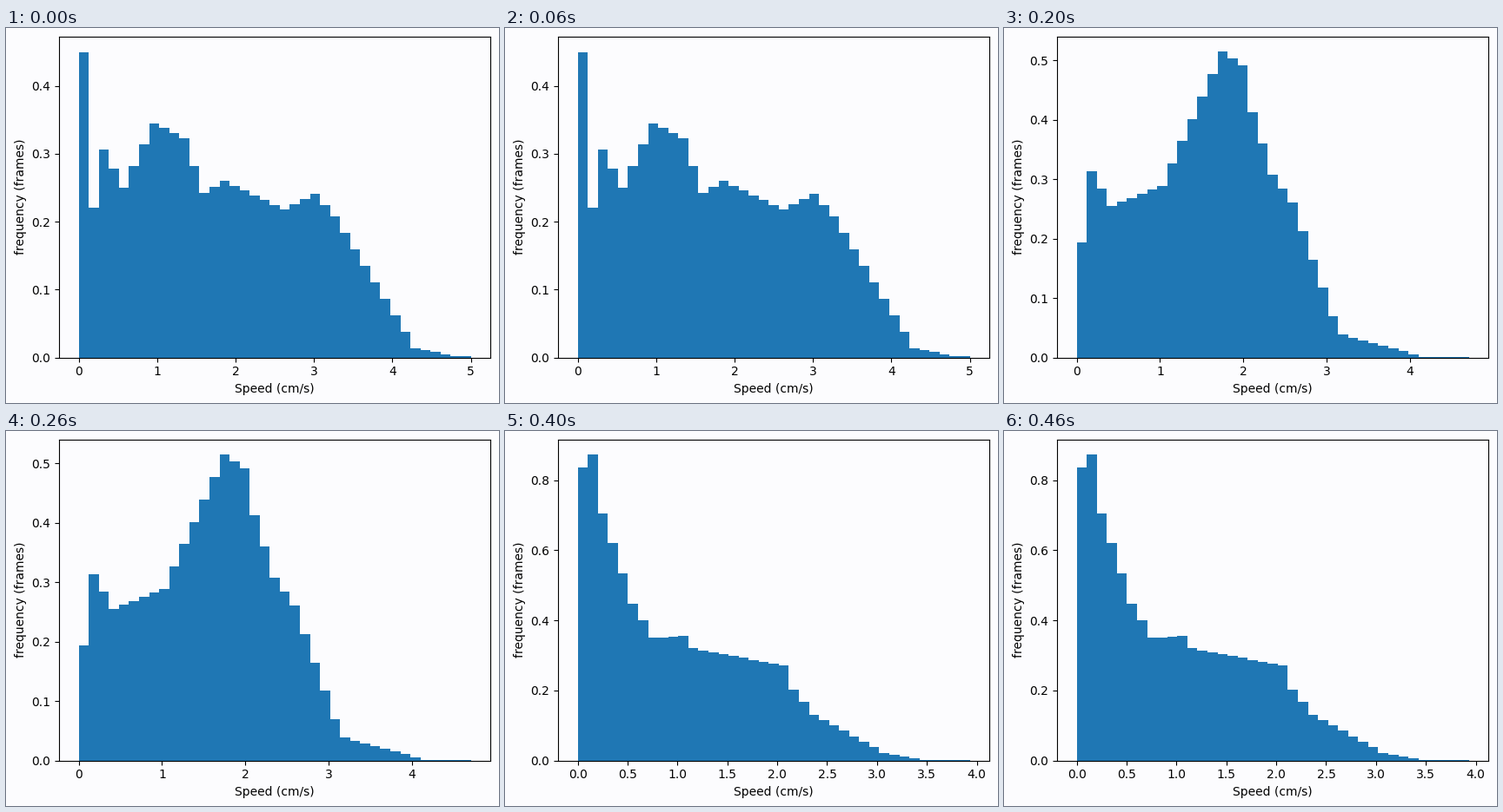
A matplotlib script that plays this animation: 567x432 px, repeating every 0.5 s.

```python
import matplotlib.pyplot as plt
import numpy as np
from matplotlib.animation import FuncAnimation

W, H, DPI = 567, 432, 100
BINS = 39
RIGHT, TOP, BOTTOM = 557.1, 9.9, 379.5
PAPER = "#fcfcfe"
BAR = "#1f77b4"

# Turning points of each outline (bin: density); bins between lie on a line.
fast = {0: .45, 1: .22, 2: .306, 4: .25, 7: .345, 10: .323, 12: .242,
        14: .26, 20: .218, 23: .241, 25: .208, 33: .014, 37: .002}
late_peak = {0: .259, 1: .184, 2: .22, 5: .219, 8: .298, 10: .275, 12: .338,
             16: .366, 19: .42, 20: .373, 24: .34, 27: .265, 30: .115,
             34: .02, 37: .001}
mid_peak = {0: .194, 1: .313, 3: .255, 8: .289, 14: .514, 16: .492, 17: .413,
            19: .307, 21: .26, 25: .07, 26: .038, 34: .001}
two_humps = {0: .497, 1: .556, 4: .5, 5: .396, 8: .288, 9: .332, 17: .364,
             19: .26, 21: .285, 22: .218, 27: .042, 32: .003}
slow = {0: .837, 1: .872, 2: .706, 5: .448, 7: .35, 10: .355, 11: .32,
        20: .271, 21: .203, 23: .131, 30: .022, 34: .001}

# outline, highest speed, left edge of the axes in pixels
PLOTS = [
    (fast, 5.0, 61.1),
    (late_peak, 4.167, 69.1),
    (mid_peak, 4.71, 61.1),
    (two_humps, 4.235, 61.1),
    (slow, 3.93, 61.1),
]

fig = plt.figure(figsize=(W / DPI, H / DPI), dpi=DPI, facecolor=PAPER)
ax = fig.add_subplot()


def draw(i):
    outline, top_speed, left = PLOTS[i % len(PLOTS)]
    density = np.interp(range(BINS), list(outline), list(outline.values()))
    edges = np.linspace(0, top_speed, BINS + 1)
    centers = (edges[:-1] + edges[1:]) / 2

    ax.clear()
    ax.set_facecolor(PAPER)
    ax.set_position([left / W, 1 - BOTTOM / H,
                     (RIGHT - left) / W, (BOTTOM - TOP) / H])
    ax.hist(centers, bins=edges, weights=density, color=BAR)
    ax.set_xlim(-0.05 * top_speed, 1.05 * top_speed)
    ax.set_ylim(0, 1.05 * density.max())
    ax.set_xlabel("Speed (cm/s)")
    ax.set_ylabel("frequency (frames)")
    return []


anim = FuncAnimation(fig, draw, frames=len(PLOTS), interval=100,
                     init_func=lambda: draw(0), repeat=True, repeat_delay=0)
plt.show()
```
